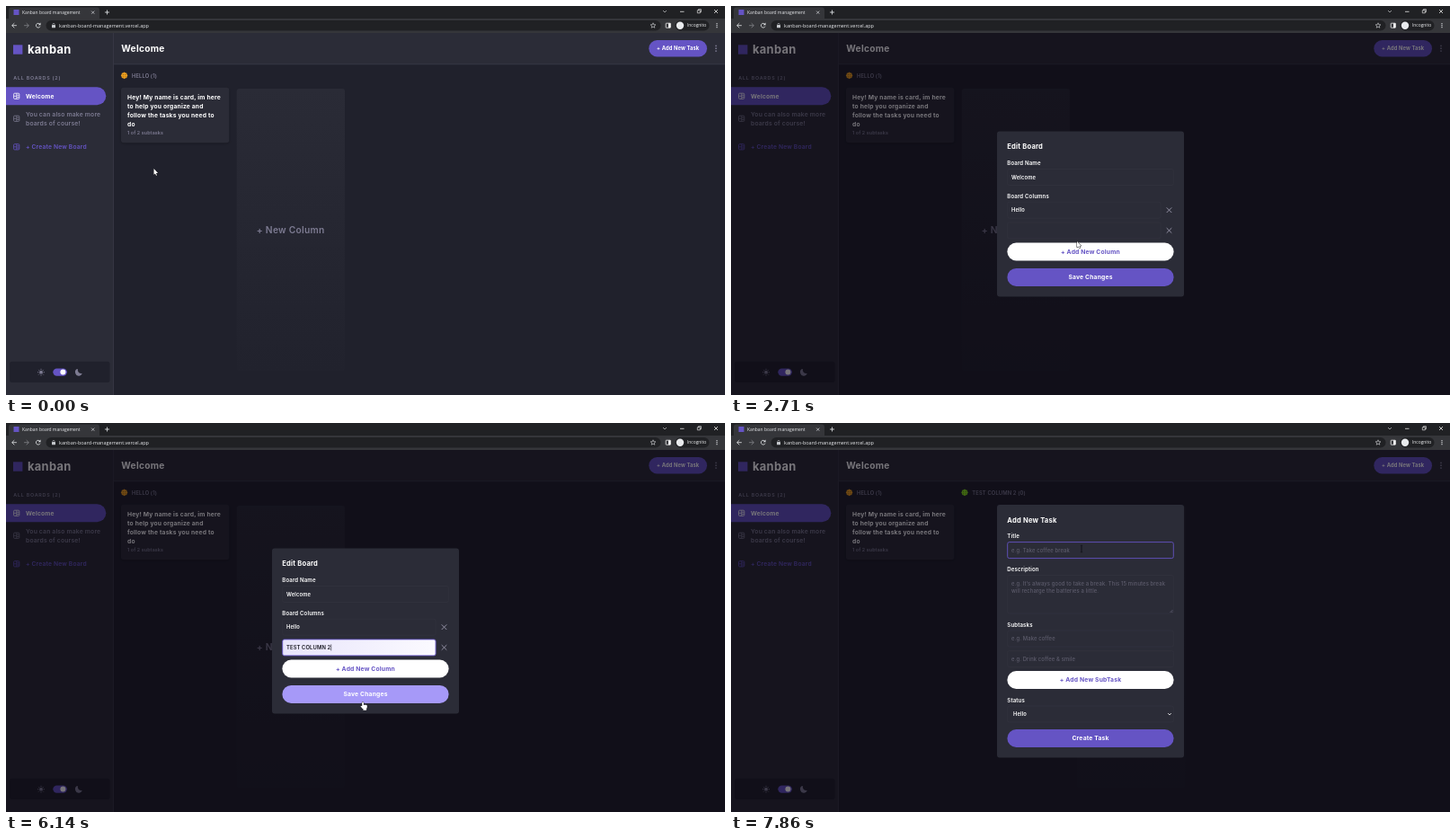
An HTML page with a canvas for the animation above (8 s loop, 800x433 px).

```html
<!DOCTYPE html>
<html lang="en">
<head>
<meta charset="utf-8">
<title>Kanban board</title>
<style>
  html, body { margin: 0; width: 100%; height: 100%; overflow: hidden; background: #20212c; }
  canvas { display: block; width: 800px; height: 433px; }
</style>
</head>
<body>
<canvas id="stage"></canvas>
<script>
const W = 800, H = 433, LOOP = 8000, FPS = 7;
const canvas = document.getElementById('stage');
const c = canvas.getContext('2d');
const ratio = window.devicePixelRatio || 1;
canvas.width = W * ratio;
canvas.height = H * ratio;

const PANEL = '#2b2c37', BACK = '#20212c', LINE = '#3b3c4a', PURPLE = '#6554c4',
  HOVER = '#a699f8', GREY = '#7d7b92', WHITE = '#ffffff', FAINT = '#343541', HINT = '#5d5c6c';
const UI = 'Inter, "Open Sans", sans-serif';
const CHROME = '"Open Sans", "Noto Sans", sans-serif';

// ---------- timeline ----------
const OPEN_EDIT = 1700, ADD_FIELD = 2560, FOCUS = 2990, AUTOFILL = 5130,
  SAVED = 6270, OPEN_TASK = 7130, FOCUS_TASK = 7700;
const path = [
  [140, 164.5, 181], [1290, 352, 158], [1571, 352, 158], [1714, 350.5, 158], [1857, 350.5, 158],
  [2430, 385, 262], [2600, 385, 262], [2990, 360, 254], [5000, 360, 254], [5857, 397, 310.5],
  [6300, 397, 310.5], [6986, 762, 43], [7140, 762, 43], [7700, 390, 140]
];
const keys = [3000, 3140, 3280, 3560, 3850, 3990, 4130, 4280, 4420, 4570, 4710];
let mouse = { x: 0, y: 0 };

function mouseAt(t) {
  let a = path[0];
  for (const b of path) {
    if (t < b[0]) {
      if (a === b) break;
      const u = Math.max(0, (t - a[0]) / (b[0] - a[0]));
      const e = u * u * (3 - 2 * u);
      return { x: a[1] + (b[1] - a[1]) * e, y: a[2] + (b[2] - a[2]) * e };
    }
    a = b;
  }
  return { x: a[1], y: a[2] };
}

const over = (x, y, w, h) => mouse.x >= x && mouse.x <= x + w && mouse.y >= y && mouse.y <= y + h;

// ---------- drawing helpers ----------
function box(x, y, w, h, r, fill, stroke, lw = 0.7) {
  c.beginPath();
  c.roundRect(x, y, w, h, r);
  if (fill) { c.fillStyle = fill; c.fill(); }
  if (stroke) { c.strokeStyle = stroke; c.lineWidth = lw; c.stroke(); }
}

function disc(x, y, r, fill) {
  c.beginPath();
  c.arc(x, y, r, 0, 7);
  c.fillStyle = fill;
  c.fill();
}

function poly(pts, color, lw = 0.8, fill = false) {
  c.beginPath();
  for (let i = 0; i < pts.length; i += 2) c.lineTo(pts[i], pts[i + 1]);
  if (fill) { c.closePath(); c.fillStyle = color; c.fill(); return; }
  c.strokeStyle = color;
  c.lineWidth = lw;
  c.stroke();
}

// y is the middle of the capitals
function text(s, x, y, size, color, weight = 600, align = 'left', space = size * 0.025, font = UI) {
  c.font = `${weight} ${size}px ${font}`;
  c.letterSpacing = space + 'px';
  c.textAlign = align;
  c.fillStyle = color;
  c.fillText(s, x, y + size * 0.36);
  return c.measureText(s).width;
}

const plain = (s, x, y, size, color) => text(s, x, y, size, color, 400, 'left', 0, CHROME);

function dots(x, y, gap, r, color) {
  for (let i = -1; i <= 1; i++) disc(x, y + i * gap, r, color);
}

// ---------- browser ----------
function browser() {
  c.fillStyle = '#202124';
  c.fillRect(0, 0, W, 14);
  c.fillStyle = '#35363a';
  c.fillRect(0, 14, W, 16);
  box(3, 1.5, 101, 14, [3, 3, 0, 0], '#35363a');
  c.fillStyle = PURPLE;
  c.fillRect(8.5, 4, 6, 6);
  plain('Kanban board management', 18, 7.2, 4.95, '#e8eaed');
  cross(96.7, 7.2, 1.6, '#dadce0', 0.7);
  poly([110, 7, 115, 7], '#e8eaed');
  poly([112.5, 4.5, 112.5, 9.5], '#e8eaed');

  poly([731, 5, 733, 7, 735, 5], '#c8c9cc', 0.7);
  poly([750, 6.3, 754.5, 6.3], WHITE, 0.7);
  box(769.3, 4.8, 3, 3, 0, null, WHITE, 0.6);
  poly([770.4, 4.8, 770.4, 3.7, 773.4, 3.7, 773.4, 6.7, 772.3, 6.7], WHITE, 0.6);
  cross(790, 6, 2, WHITE, 0.7);

  arrow(9.3, 21.7, -1, '#e8eaed');
  arrow(22.7, 21.7, 1, '#83858a');
  c.beginPath();
  c.arc(35.8, 21.7, 2.4, 0.4, 5.4);
  c.strokeStyle = '#e8eaed';
  c.lineWidth = 0.8;
  c.stroke();
  poly([38.5, 18.6, 38.5, 21.2, 35.9, 21.2], '#e8eaed', 0.8, true);

  box(44.5, 16, 684, 11.5, 5.75, '#202124');
  box(51, 21, 4, 3.2, 0.5, '#c4c7cb');
  c.beginPath();
  c.arc(53, 20.7, 1.3, Math.PI, 0);
  c.strokeStyle = '#c4c7cb';
  c.lineWidth = 0.6;
  c.stroke();
  plain('kanban-board-management.vercel.app', 59, 21.8, 5.5, '#e8eaed');

  const star = [];
  for (let i = 0; i <= 10; i++) {
    const r = i % 2 ? 1.3 : 3, a = i * Math.PI / 5 - Math.PI / 2;
    star.push(720 + r * Math.cos(a), 21.8 + r * Math.sin(a));
  }
  poly(star, '#dadce0', 0.6);
  box(734.2, 19.2, 5.2, 5, 0.5, null, '#f1f1f2', 0.8);
  c.fillStyle = '#f1f1f2';
  c.fillRect(737, 19.2, 2.4, 5);
  box(744.5, 16, 38, 11.5, 5.75, '#202124');
  disc(750, 21.7, 4.2, '#e8eaed');
  plain('Incognito', 758, 21.7, 4.9, '#f1f3f4');
  dots(791, 21.7, 2, 0.65, '#e8eaed');
}

function cross(x, y, r, color, lw) {
  poly([x - r, y - r, x + r, y + r], color, lw);
  poly([x - r, y + r, x + r, y - r], color, lw);
}

function arrow(x, y, dir, color) {
  poly([x - 2.6 * dir, y, x + 2.6 * dir, y], color);
  poly([x, y - 2.6, x + 2.6 * dir, y, x, y + 2.6], color);
}

// ---------- board ----------
function boardIcon(y, color) {
  box(8.6, y - 3.1, 6.2, 6.2, 1, null, color, 0.8);
  poly([11.8, y - 3, 11.8, y + 3], color, 0.7);
  poly([8.8, y, 11.8, y], color, 0.7);
  poly([11.8, y - 1, 14.6, y - 1], color, 0.7);
  poly([11.8, y + 1.2, 14.6, y + 1.2], color, 0.7);
}

function sidebar() {
  c.fillStyle = PANEL;
  c.fillRect(0, 30, 120, H - 30);
  c.fillStyle = PURPLE;
  c.fillRect(8, 43.3, 10.4, 10.4);
  text('kanban', 24, 48.4, 12.9, WHITE, 700);
  text('ALL BOARDS (2)', 8.3, 80.2, 5.4, GREY, 600, 'left', 0.75);
  box(0, 90.3, 111.3, 20, [0, 10, 10, 0], PURPLE);
  boardIcon(100.3, WHITE);
  text('Welcome', 22, 100.3, 6.7, WHITE, 700);
  boardIcon(125.3, GREY);
  text('You can also make more', 22, 120.2, 6.8, GREY);
  text('boards of course!', 22, 130.2, 6.8, GREY);
  boardIcon(156.8, PURPLE);
  text('+ Create New Board', 22, 156.8, 6.7, PURPLE);

  box(4, 395.8, 111.5, 23.2, 2.5, BACK);
  disc(39, 407.7, 1.9, GREY);
  for (let i = 0; i < 8; i++) {
    const a = i * Math.PI / 4, x = Math.cos(a), y = Math.sin(a);
    poly([39 + x * 2.7, 407.7 + y * 2.7, 39 + x * 3.9, 407.7 + y * 3.9], GREY, 0.9);
  }
  box(52.3, 403.4, 15.6, 8.4, 4.2, PURPLE);
  disc(63.4, 407.6, 3, WHITE);
  c.beginPath();
  c.arc(81, 407.6, 4, -1.9, 0.35, true);
  c.quadraticCurveTo(79.6, 409.4, 79.7, 403.8);
  c.fillStyle = GREY;
  c.fill();
}

function columnIcon(x, color) {
  const pts = [];
  for (let i = 0; i < 32; i++) {
    const a = i * Math.PI / 16, r = 3.5 + 0.3 * Math.cos(a * 8);
    pts.push(x + r * Math.cos(a), 77.4 + r * Math.sin(a));
  }
  poly(pts, color, 1, true);
  for (const [dx, dy] of [[-1.3, -1], [1.3, -1], [-1.3, 1.3], [1.3, 1.3]])
    disc(x + dx, 77.4 + dy, 0.5, 'rgba(50,45,10,.7)');
}

function board(extra, live) {
  c.fillStyle = BACK;
  c.fillRect(0, 29, W, H - 29);
  sidebar();
  c.fillStyle = PANEL;
  c.fillRect(120, 30, W - 120, 35);
  c.fillStyle = LINE;
  c.fillRect(119.3, 30, 0.7, H - 30);
  c.fillRect(120, 64.5, W - 120, 0.7);
  text('Welcome', 128.3, 47.2, 10.2, WHITE, 700);
  const hot = live && over(715, 38, 65, 18);
  box(715.3, 38, 64.7, 18.4, 9.2, hot ? HOVER : PURPLE);
  text('+ Add New Task', 747.7, 47.2, 5.74, WHITE, 700, 'center');
  dots(790, 47.2, 2.9, 0.9, GREY);

  columnIcon(131.6, '#f0a020');
  text('HELLO (1)', 140, 77.6, 5.75, GREY);
  c.shadowColor = 'rgba(0,0,0,.25)';
  c.shadowBlur = 3 * ratio;
  c.shadowOffsetY = ratio;
  box(128, 90.7, 120.3, 61.6, 3, PANEL);
  c.shadowColor = 'transparent';
  ['Hey! My name is card, im here', 'to help you organize and', 'follow the tasks you need to', 'do']
    .forEach((s, i) => text(s, 135, 101.2 + i * 10, 6.75, WHITE, 700));
  text('1 of 2 subtasks', 135, 141.3, 5.3, GREY);

  if (extra) {
    columnIcon(260, '#86e01e');
    text('TEST COLUMN 2 (0)', 268.3, 77.6, 5.8, GREY);
  }
  const x = extra ? 385 : 256.7;
  const g = c.createLinearGradient(0, 92, 0, 406);
  g.addColorStop(0, '#2a2b36');
  g.addColorStop(1, '#21222d');
  box(x, 92, 120.3, 314.3, 3, g);
  text('+ New Column', x + 60, 249, 10.25, live && over(x, 92, 120, 314) ? PURPLE : GREY, 600, 'center');
}

// ---------- dialogs ----------
function dialog(y, h, title) {
  c.fillStyle = 'rgba(4,0,10,.54)';
  c.fillRect(0, 30, W, H - 30);
  box(296, y, 208, h, 3, PANEL);
  text(title, 307.3, y + 17, 7.6, WHITE, 700);
}

const label = (s, y) => text(s, 307.3, y, 6.05, WHITE);

function field(value, y, w, color = WHITE, focused = false, fill = null, h = 18) {
  box(307.7, y - 9, w, h, 2, fill, focused ? PURPLE : FAINT, focused ? 0.9 : 0.6);
  return text(value, 312, y, 5.8, color, color === HINT ? 500 : 600);
}

function button(s, y, fill, color) {
  box(307.4, y, 185.2, 20, 10, fill);
  text(s, 400, y + 10, 6.75, color, 700, 'center');
}

function editDialog(t) {
  const two = t >= ADD_FIELD, y = two ? 139.5 : 151, drop = two ? 22.7 : 0;
  dialog(y, two ? 184 : 161.3, 'Edit Board');
  label('Board Name', y + 35.7);
  field('Welcome', y + 51, 184.6);
  label('Board Columns', y + 72.3);
  field('Hello', y + 87.7, 170.4);
  cross(487.5, y + 87.7, 2.8, '#9c9aae', 0.9);
  if (two) {
    const filled = t >= AUTOFILL, row = y + 110.4;
    const value = filled ? 'TEST COLUMN 2' : 'Test column'.slice(0, keys.filter(k => t >= k).length);
    let fill = null;
    if (filled) {
      fill = c.createLinearGradient(308, 0, 478, 0);
      fill.addColorStop(0, '#e8e5fb');
      fill.addColorStop(1, '#fbfaff');
    }
    const ink = filled ? '#17171f' : WHITE;
    const w = field(value, row, 170.4, ink, t >= FOCUS, fill);
    if (t >= FOCUS) poly([312.4 + w, row - 3.5, 312.4 + w, row + 3.5], ink, 0.6);
    cross(487.5, row, 2.8, '#9c9aae', 0.9);
  }
  button('+ Add New Column', y + 101.3 + drop, WHITE, PURPLE);
  const save = y + 129.7 + drop;
  button('Save Changes', save, over(307, save, 186, 20) ? HOVER : PURPLE, WHITE);
}

function taskDialog(t) {
  dialog(91, 281.5, 'Add New Task');
  label('Title', 126.2);
  field('e.g. Take coffee break', 141.6, 184.6, HINT, t >= FOCUS_TASK);
  label('Description', 162.8);
  field('e.g. It\u2019s always good to take a break. This 15 minutes break', 178.5, 184.6, HINT, false, null, 42.5);
  text('will recharge the batteries a little.', 312, 187, 5.8, HINT, 500);
  poly([488.5, 211, 491.5, 208], GREY, 0.5);
  poly([490.3, 211, 491.5, 209.8], GREY, 0.5);
  label('Subtasks', 224.5);
  field('e.g. Make coffee', 240, 184.6, HINT);
  field('e.g. Drink coffee & smile', 262.6, 184.6, HINT);
  button('+ Add New SubTask', 276, WHITE, PURPLE);
  label('Status', 308.6);
  box(307.7, 315, 184.6, 18, 2, null, FAINT, 0.6);
  text('Hello', 314, 324, 5.8, WHITE);
  poly([486.3, 323.2, 488, 324.9, 489.7, 323.2], WHITE, 0.9);
  button('Create Task', 341, PURPLE, WHITE);
}

// ---------- pointer ----------
function pointer(kind) {
  const { x, y } = mouse;
  c.save();
  c.translate(x, y);
  if (kind === 'beam') {
    poly([0, -3.6, 0, 3.6], '#08080c', 0.7);
    poly([-1.2, -3.8, 1.2, -3.8], '#08080c', 0.5);
    poly([-1.2, 3.8, 1.2, 3.8], '#08080c', 0.5);
  } else if (kind === 'hand') {
    c.beginPath();
    c.roundRect(-0.8, 0, 1.7, 6, 0.8);
    c.roundRect(-0.8, 3.3, 5.6, 4, 1.2);
    c.roundRect(0.2, 5, 4, 4.2, 0.6);
    c.moveTo(-0.6, 7.2);
    c.lineTo(-2.6, 4.8);
    c.lineTo(-1.7, 4.2);
    c.lineTo(0.4, 5.6);
    c.lineTo(1, 8.6);
    c.closePath();
    c.strokeStyle = '#111116';
    c.lineWidth = 0.8;
    c.stroke();
    c.fillStyle = WHITE;
    c.fill();
  } else {
    const tip = [0, 0, 0, 6.8, 1.5, 5.5, 2.5, 7.8, 3.5, 7.4, 2.5, 5.1, 4.6, 5];
    poly(tip.concat(0, 0), '#111116', 0.9);
    poly(tip, WHITE, 1, true);
  }
  c.restore();
}

function pointerKind(t) {
  if (t < OPEN_EDIT) return over(256.7, 92, 120.3, 314) ? 'hand' : over(128, 91, 120, 61) ? 'hand' : 'arrow';
  if (t < SAVED) {
    const y = t >= ADD_FIELD ? 139.5 : 151, drop = t >= ADD_FIELD ? 22.7 : 0;
    if (over(307, y + 101.3 + drop, 186, 20) || over(307, y + 129.7 + drop, 186, 20)) return 'hand';
    if (over(307, y + 42, 186, 18) || over(307, y + 78.7, 171, 18 + drop)) return 'beam';
    return 'arrow';
  }
  if (t < OPEN_TASK) return over(385, 92, 120, 314) || over(715, 38, 65, 18) ? 'hand' : 'arrow';
  return over(307, 132, 186, 19) ? 'beam' : 'arrow';
}

function draw(t) {
  mouse = mouseAt(t);
  c.setTransform(ratio, 0, 0, ratio, 0, 0);
  const editing = t >= OPEN_EDIT && t < SAVED, adding = t >= OPEN_TASK;
  board(t >= SAVED, !editing && !adding);
  if (editing) editDialog(t);
  if (adding) taskDialog(t);
  browser();
  pointer(pointerKind(t));
}

function tick(now) {
  const t = now % LOOP;
  draw(Math.floor((t + 3) * FPS / 1000) * 1000 / FPS % LOOP);
  requestAnimationFrame(tick);
}
draw(0);
requestAnimationFrame(tick);
</script>
</body>
</html>
```
